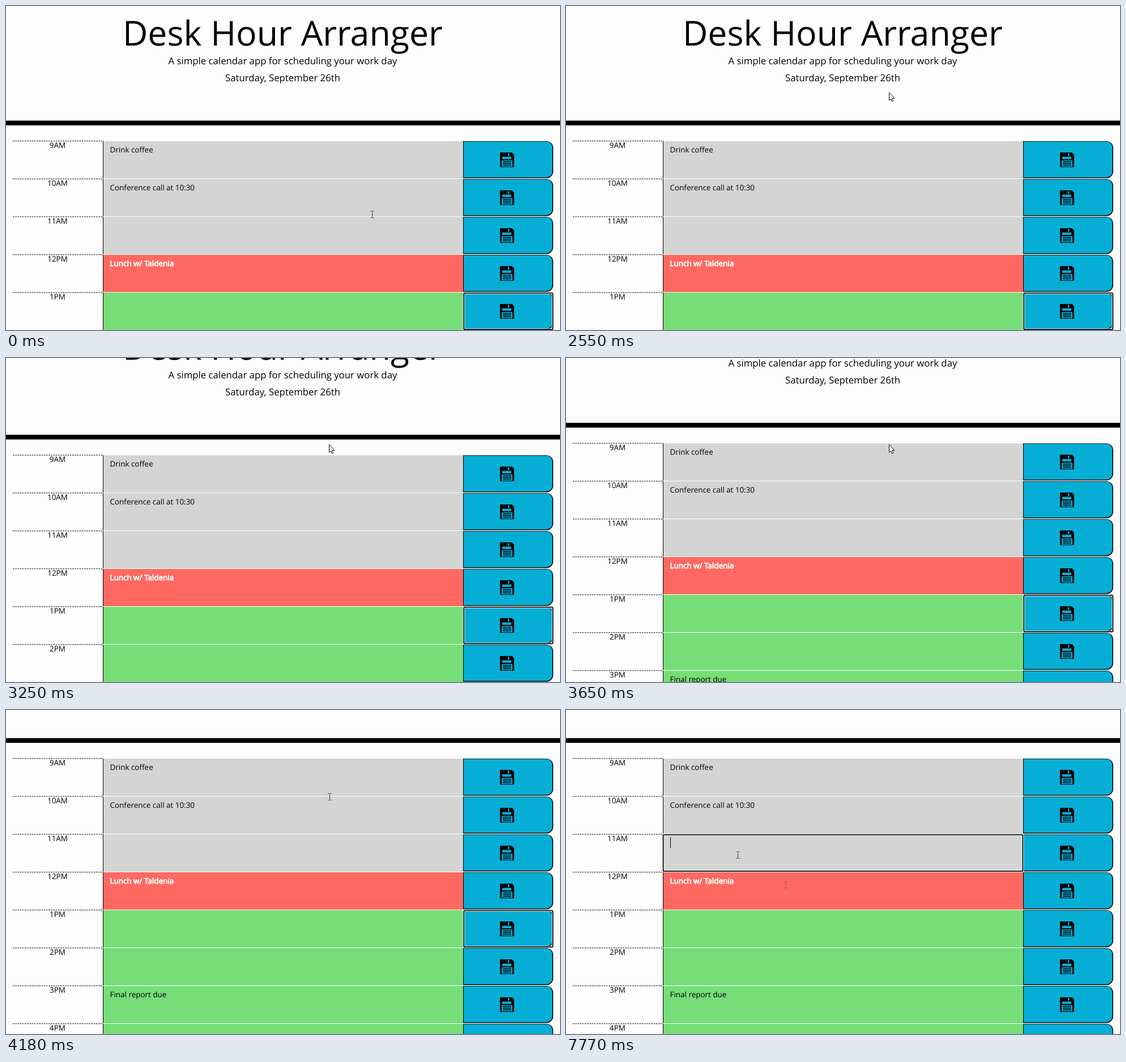
Write an HTML page that moves like this. It is 978x573 px and loops after 7.99 s.

```html
<!DOCTYPE html>
<html lang="en">
<head>
<meta charset="utf-8">
<title>Desk Hour Arranger</title>
<style>
  html, body { margin: 0; width: 100%; height: 100%; overflow: hidden; background: #fdfdfd; }
  svg { display: block; width: 978px; height: 573px; }
  text { font-family: "Open Sans", "Noto Sans", sans-serif; font-size: 13.45px; text-rendering: geometricPrecision; }
  .mid { text-anchor: middle; }
  .title { font-size: 60.8px; }
  .lead { font-size: 16.75px; }
  .now { fill: #fff; stroke: #fff; stroke-width: .8; }
  .focus rect { fill: none; stroke: #000; stroke-width: 1.8; }
  .focus .halo { stroke: #fff; stroke-width: 3.6; }
</style>
</head>
<body>
<svg viewBox="0 0 978 573">
  <defs>
    <g id="save">
      <path d="M807 1H954A12 12 0 0 1 966 13V54.5A12 12 0 0 1 954 66.5H807Z"/>
      <path d="M808 1.8H954A10.5 10.5 0 0 1 964.5 12.5V54.5A10.5 10.5 0 0 1 954 65H808Z" fill="#06aed5"/>
      <path d="M873 21H893L897 25V46Q897 47 896 47H873Q872 47 872 46V22Q872 21 873 21Z"/>
      <path d="M886 22.5H888.5V27H886ZM876 28.5H892V33H876ZM875 35H894V46H875Z" fill="#06aed5"/>
      <path d="M877 37.5H892M877 40.5H892M877 43.5H892" stroke="#000" stroke-width="1.4"/>
    </g>
    <path id="beam" d="M-3 -6H-1L0 -5L1 -6H3M0 -5V5M-3 6H-1L0 5L1 6H3" fill="none" stroke="#333"/>
    <path id="arrow" d="M.5 0V14L3.6 11.2L5.7 16L7.8 15L5.7 10.4H10Z" fill="#fff" stroke="#111" stroke-linejoin="round"/>
  </defs>
  <g id="page">
    <text class="mid title" x="488.5" y="70">Desk Hour Arranger</text>
    <text class="mid lead" x="488.5" y="103">A simple calendar app for scheduling your work day</text>
    <text class="mid lead" x="488.5" y="133">Saturday, September 26th</text>
    <rect y="202.7" width="978" height="8.4"/>
    <g id="rows"></g>
    <g id="buttonFocus" class="focus"></g>
    <g id="noteFocus" class="focus"></g>
    <rect id="caret" x="184" y="378" width="1" height="19"/>
  </g>
  <use id="trail" href="#beam" x="388" y="309" opacity=".35"/>
  <use id="cursor"/>
</svg>
<script>
const LOOP = 7990, TICK = 77, BLINK = 545;
const ROW_TOP = 238, ROW_HEIGHT = 67;
const SCROLL_DONE = 4180, CLICK = 6680;
const notes = { 0: "Drink coffee", 1: "Conference call at 10:30", 3: "Lunch w/ Taldenia", 6: "Final report due" };
const $ = id => document.getElementById(id);
const rowY = i => ROW_TOP + i * ROW_HEIGHT;

function rowMarkup(i) {
  const hour = `${(i + 8) % 12 + 1}${i < 3 ? "AM" : "PM"}`;
  const color = i < 3 ? "#d3d4d3" : i === 3 ? "#ff6961" : "#77dd77";
  return `<g transform="translate(0 ${rowY(i)})">
    <path d="M12 .8H171" stroke="#000" stroke-dasharray="2.7 1.5"/>
    <text class="mid" x="91" y="13">${hour}</text>
    <rect x="171" y="1" width="636" height="66" fill="${color}"/>
    <rect x="171" y="1" width="1" height="66"/>
    <text class="${i === 3 ? "now" : ""}" x="183.5" y="21">${notes[i] || ""}</text>
    <use href="#save"/></g>`;
}

function focusMarkup(row, left, right) {
  const box = `x="${left}" y="${rowY(row) + 1.6}" width="${right - left}" height="64.6" rx="2"`;
  return `<rect class="halo" ${box}/><rect ${box}/>`;
}

$("rows").innerHTML = Array.from({ length: 9 }, (_, i) => rowMarkup(i)).join("");
$("buttonFocus").innerHTML = focusMarkup(4, 808.3, 965.4);
$("noteFocus").innerHTML = focusMarkup(2, 171.6, 806.4);

// Pointer glides along Bezier curves and rests in between.
const glides = [
  { start: 920, end: 1530, curve: [[646, 368], [670, 320], [618, 253]] },
  { start: 1700, end: 2550, curve: [[613, 250], [546, 190], [570, 153]] },
  { start: SCROLL_DONE, end: SCROLL_DONE, curve: [[571, 153]] },
  { start: 5750, end: 5970, curve: [[570, 155], [505, 235], [397, 313]] },
  { start: 6200, end: CLICK, curve: [[388, 309], [335, 290], [303, 256]] }
];

const clamp = p => Math.max(0, Math.min(1, p));
const ease = p => p * p * p * (p * (p * 6 - 15) + 10);

function stepped(t, start, end) {
  const steps = Math.round((end - start) / TICK);
  return steps ? Math.floor(clamp((t - start) / (end - start)) * steps + .01) / steps : 0;
}

function bezier(points, p) {
  if (points.length === 1) return points[0];
  const mix = (a, b) => a.map((v, i) => v + (b[i] - v) * p);
  return bezier(points.slice(1).map((b, i) => mix(points[i], b)), p);
}

function pointerAt(t) {
  const { start, end, curve } = glides.filter(g => g.start <= t).pop() || glides[0];
  return bezier(curve, stepped(t, start, end)).map(Math.floor);
}

// One turn of the wheel; the first visible step is already part of the way in.
function wheel(t, start, end, distance, lead) {
  return t < start ? 0 : distance * ease(lead + (1 - lead) * stepped(t, start, end));
}
const scrollAt = t => Math.round(wheel(t, 3170, 3330, 84, .345) + wheel(t, 3650, 3880, 69, .2));

const show = (id, visible) => $(id).setAttribute("visibility", visible ? "visible" : "hidden");

function render(t) {
  const [x, y] = pointerAt(t);
  const overHeader = y < ROW_TOP && t < SCROLL_DONE;
  const offset = overHeader ? 0 : .5;
  const focused = t >= CLICK;
  $("cursor").setAttribute("href", overHeader ? "#arrow" : "#beam");
  $("cursor").setAttribute("x", x + offset);
  $("cursor").setAttribute("y", y + offset);
  $("page").setAttribute("transform", `translate(0 ${-scrollAt(t)})`);
  show("buttonFocus", !focused);
  show("noteFocus", focused);
  show("caret", focused && Math.floor((t - CLICK + 15) / BLINK) % 2 === 0);
  show("trail", t >= 6280);
}

const began = performance.now();
function tick() {
  render((performance.now() - began) % LOOP);
  requestAnimationFrame(tick);
}
tick();
</script>
</body>
</html>
```
